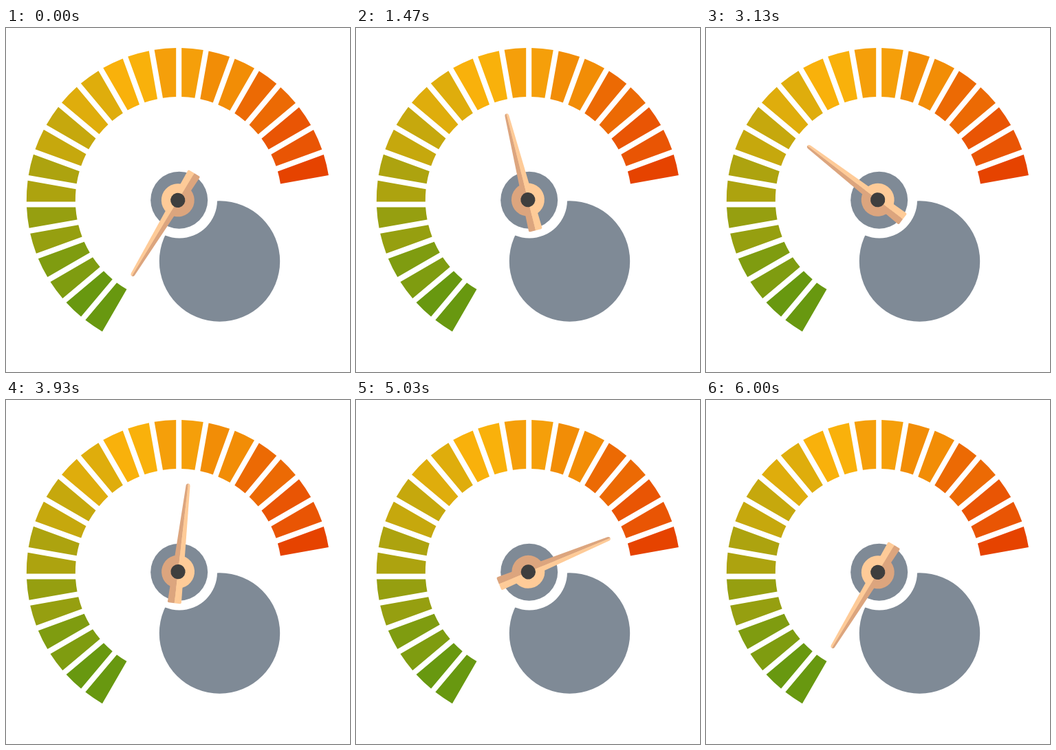
An HTML page with a canvas that plays this animation: 500x500 px, repeating every 6.06 s.

```html
<!DOCTYPE html>
<html>
<head>
<meta charset="utf-8">
<title>Gauge</title>
<style>
html, body { margin: 0; width: 100%; height: 100%; overflow: hidden; background: #fff; }
canvas { display: block; width: 500px; height: 500px; }
</style>
</head>
<body>
<canvas id="stage" width="500" height="500"></canvas>
<script>
const ctx = document.getElementById('stage').getContext('2d');
const LOOP = 6060, FRAME = 100 / 3, RAD = Math.PI / 180;

// The gaps meet a little below the centre of the dial.
const DIAL = { x: 250.8, y: 250, outer: 221, inner: 150 };
const FOCUS = { x: 251.2, y: 256.5 }, GAP = 8;

// One colour for each pair of segments, from low to high.
const COLORS = ['#689810', '#7f9c10', '#969f10', '#ada30f', '#c6a80d', '#dfad0c',
  '#f9b10b', '#f59f0a', '#f28d06', '#ec6a04', '#e95504', '#e64300'];
const GREY = '#7f8a96', LIGHT = '#fecb98', DARK = '#dca57e', HUB = '#3e3e3e';

// Needle turns: start ms, end ms, from and to in degrees clockwise from up.
const MOVES = [
  [0, 2000, -148.7, -3],
  [2000, 3000, -3, -53],
  [3000, 4000, -53, 6.7],
  [4333, 5000, 6.7, 67.6],
  [5333, 6000, 67.6, -148.7]
];

const ease = x => x < 0.5 ? 4 * x ** 3 : 1 - 4 * (1 - x) ** 3;

function angleAt(t) {
  let angle = MOVES[0][2];
  for (const [start, end, from, to] of MOVES) {
    if (t < start) break;
    angle = from + (to - from) * ease(Math.min(1, (t - start) / (end - start)));
  }
  return angle;
}

function disc(x, y, r, color) {
  ctx.fillStyle = color;
  ctx.beginPath();
  ctx.arc(x, y, r, 0, 2 * Math.PI);
  ctx.fill();
}

// Angle on the dial circle of radius r where the edge beside a ray crosses it.
function edgeAngle(deg, side, r) {
  const dx = Math.sin(deg * RAD), dy = -Math.cos(deg * RAD);
  const x = FOCUS.x - DIAL.x - side * dy * GAP / 2;
  const y = FOCUS.y - DIAL.y + side * dx * GAP / 2;
  const dot = x * dx + y * dy;
  const s = Math.sqrt(dot * dot - x * x - y * y + r * r) - dot;
  return Math.atan2(y + s * dy, x + s * dx);
}

function segment(i) {
  const { x, y, outer, inner } = DIAL;
  const from = -150 + 10 * i, to = from + 10;
  ctx.fillStyle = COLORS[i >> 1];
  ctx.beginPath();
  ctx.arc(x, y, outer, edgeAngle(from, 1, outer), edgeAngle(to, -1, outer));
  ctx.arc(x, y, inner, edgeAngle(to, -1, inner), edgeAngle(from, 1, inner), true);
  ctx.closePath();
  ctx.fill();
}

// Half of the needle: side -1 is left, 1 is right when it points up.
function needleHalf(side, color) {
  ctx.fillStyle = color;
  ctx.beginPath();
  ctx.moveTo(0, -129);
  ctx.quadraticCurveTo(side * 2.7, -129, side * 3, -125.5);
  ctx.lineTo(side * 10, 44);
  ctx.quadraticCurveTo(side * 10, 46, side * 8, 46);
  ctx.lineTo(0, 46);
  ctx.closePath();
  ctx.fill();
  ctx.beginPath();
  ctx.arc(0, 0, 24, -Math.PI / 2, Math.PI / 2, side < 0);
  ctx.fill();
}

function draw(t) {
  ctx.fillStyle = '#fff';
  ctx.fillRect(0, 0, 500, 500);
  for (let i = 0; i < 23; i++) segment(i);
  disc(310.5, 339, 87.7, GREY);
  disc(252, 250.5, 55, '#fff');
  disc(251.7, 250.2, 41.5, GREY);

  ctx.save();
  ctx.translate(250, 250);
  ctx.rotate(angleAt(t) * RAD);
  ctx.translate(0, -0.4);
  ctx.fillStyle = LIGHT;
  ctx.fillRect(-0.5, -126, 1, 171);
  needleHalf(-1, DARK);
  needleHalf(1, LIGHT);
  disc(0, 0, 10.6, HUB);
  ctx.restore();
}

function tick() {
  const t = performance.now() % LOOP;
  draw(Math.min(180, Math.floor(t / FRAME + 0.15)) * FRAME);
  requestAnimationFrame(tick);
}
tick();
</script>
</body>
</html>
```
